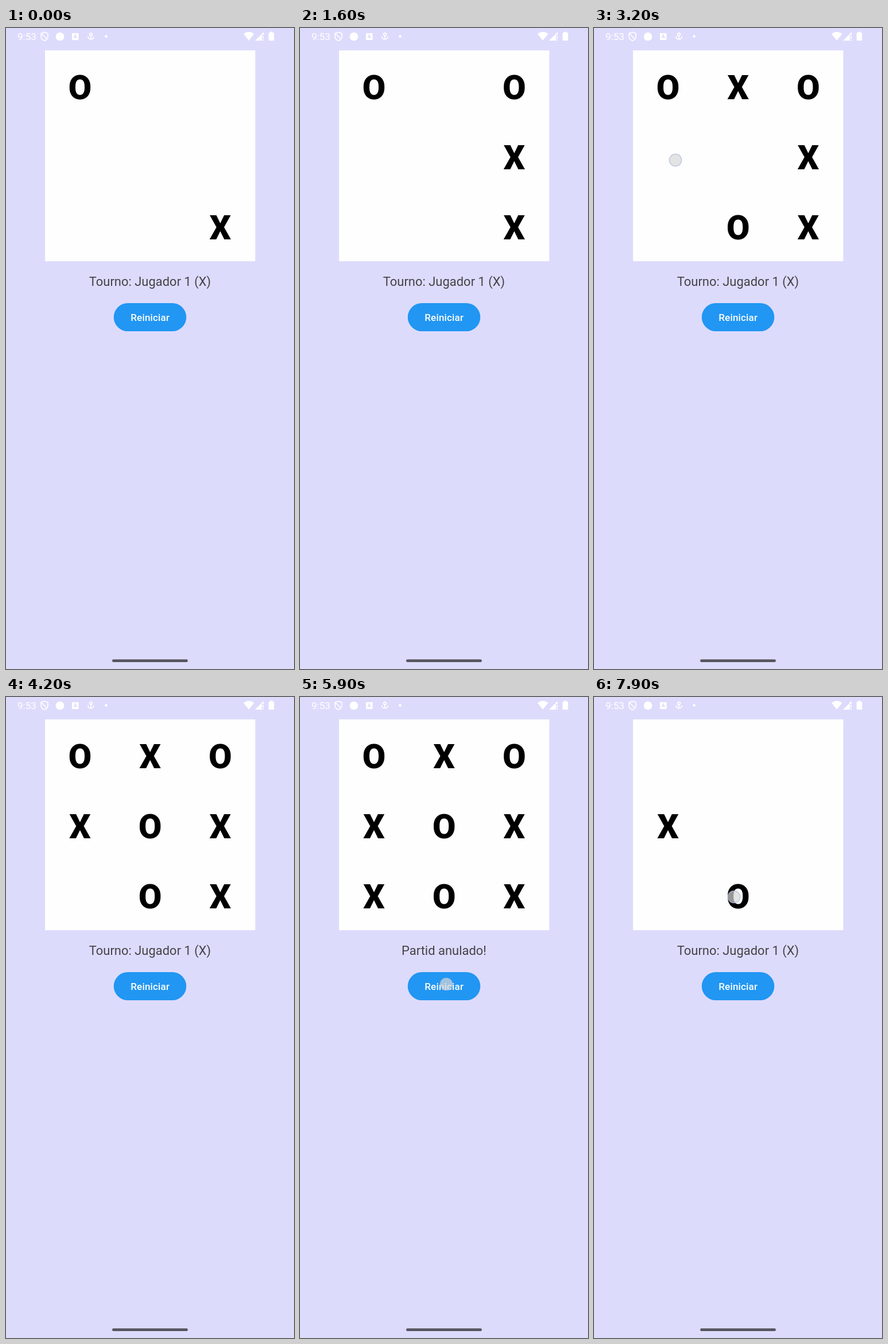
Write an HTML page that moves like this. It is 502 px wide and 1116 px high and loops after 8 s.

```html
<!DOCTYPE html>
<html lang="es">
<head>
<meta charset="utf-8">
<title>Tres en raya</title>
<style>
  html, body { margin: 0; width: 100%; height: 100%; overflow: hidden; background: #dddbfc; }
  svg { display: block; width: 502px; height: 1116px; font-family: Roboto, sans-serif; }
  .mark { font-size: 58.6px; font-weight: 900; text-anchor: middle; fill: #000; }
  .status { font-size: 21.96px; text-anchor: middle; fill: #444348; }
  .label { font-size: 17.08px; font-weight: 500; letter-spacing: .12px; text-anchor: middle; fill: #fff; }
  .clock { font-size: 17.1px; fill: #fff; }
  .line { fill: none; stroke: #fff; stroke-width: 1.6; stroke-linejoin: round; }
</style>
</head>
<body>
<svg viewBox="0 0 502 1116">
  <rect width="502" height="1116" fill="#dddbfc"/>

  <!-- system bar -->
  <text class="clock" x="20" y="20.5">9:53</text>
  <g fill="#fff">
    <path class="line" d="M67 7.3l6 2.3v4.6c0 4-2.5 6.7-6 8.1c-3.500-1.400-6-4.100-6-8.100v-4.600zM61.500 9.500l10 10"/>
    <circle cx="94" cy="15" r="7.300"/>
    <rect x="115" y="9" width="11.500" height="12" rx="1.300"/>
    <path d="M118.200 18l2.500-6.500l2.500 6.500M119.200 16h3" fill="none" stroke="#dddbfc" stroke-width="1.300"/>
    <circle class="line" cx="148" cy="11" r="2.300"/>
    <path class="line" d="M148 13.500v6M143 14.500c0 3 2 5 5 5s5-2 5-5"/>
    <circle cx="174.500" cy="14.500" r="2.300"/>
    <path d="M414 10.300c5.500-4.900 13-4.900 18.500 0l-9.250 11.500z"/>
    <path d="M434 22L449 7v5h-3v10z"/>
    <path d="M447.300 13.500h1.700v5h-1.700zM447.300 20h1.700v2h-1.700z"/>
    <path d="M460.500 8v-1.500h4V8h1.500q1.300 0 1.300 1.300v11.500q0 1.300-1.300 1.300h-7q-1.300 0-1.300-1.300V9.300q0-1.300 1.300-1.300z"/>
  </g>

  <rect x="68" y="39" width="366.500" height="367" fill="#fefefe"/>
  <g id="board"></g>
  <text id="status" class="status" x="251" y="449"></text>

  <rect x="187.800" y="479" width="126.500" height="49" rx="24.500" fill="#2196f3"/>
  <rect id="ripple" x="187.800" y="479" width="126.500" height="49" rx="24.500" fill="#fff" opacity=".12"/>
  <text class="label" x="251.200" y="510">Reiniciar</text>

  <circle id="touch" r="10.700" fill="#d7d7d7" fill-opacity=".7" stroke="#a9b8da" stroke-opacity=".75" stroke-width="1.300"/>
  <rect x="185" y="1099.300" width="132" height="4.800" rx="2.400" fill="#57565f"/>
</svg>
<script>
  const LOOP = 8000;
  const START_BOARD = 'O.......X';
  // [time, mark, cell]; a move without a mark clears the board
  const moves = [
    [600, 'X', 5], [1100, 'O', 2],
    [1900, 'X', 1], [2400, 'O', 7],
    [3300, 'X', 3], [3800, 'O', 4],
    [4700, 'X', 6], [6100],
    [6700, 'X', 3], [7200, 'O', 7]
  ];
  // [from, to, x, y]
  const touches = [
    [500, 800, 386, 222], [1800, 2100, 258, 106], [3100, 3400, 142, 230],
    [4600, 4900, 185, 329], [5800, 6200, 255, 500], [6600, 6900, 148, 220],
    [7880, LOOP, 244, 348]
  ];

  const byId = id => document.getElementById(id);
  const show = (el, on) => el.setAttribute('visibility', on ? 'visible' : 'hidden');
  const status = byId('status'), ripple = byId('ripple'), touch = byId('touch');

  const cells = Array.from({ length: 9 }, (_, i) => {
    const cell = document.createElementNS(status.namespaceURI, 'text');
    cell.setAttribute('class', 'mark');
    cell.setAttribute('x', 129 + (i % 3) * 122.2);
    cell.setAttribute('y', 123.5 + Math.floor(i / 3) * 122.2);
    return byId('board').appendChild(cell);
  });

  function boardAt(t) {
    let board = [...START_BOARD];
    for (const [time, mark, cell] of moves) {
      if (time > t) break;
      if (mark) board[cell] = mark;
      else board.fill('.');
    }
    return board;
  }

  function statusOf(board) {
    const count = mark => board.filter(m => m === mark).length;
    if (!count('.')) return 'Partid anulado!';
    return count('X') > count('O') ? 'Tourno: Jugador Bot (O)' : 'Tourno: Jugador 1 (X)';
  }

  function render(t) {
    const board = boardAt(t);
    cells.forEach((cell, i) => { cell.textContent = board[i] === '.' ? '' : board[i]; });
    status.textContent = statusOf(board);
    show(ripple, t >= 6000 && t < 6300);

    const active = touches.find(([from, to]) => t >= from && t < to);
    show(touch, active);
    if (active) touch.setAttribute('transform', `translate(${active[2]} ${active[3]})`);
  }

  const start = performance.now();
  function tick() {
    render((performance.now() - start) % LOOP);
    requestAnimationFrame(tick);
  }
  tick();
</script>
</body>
</html>
```
